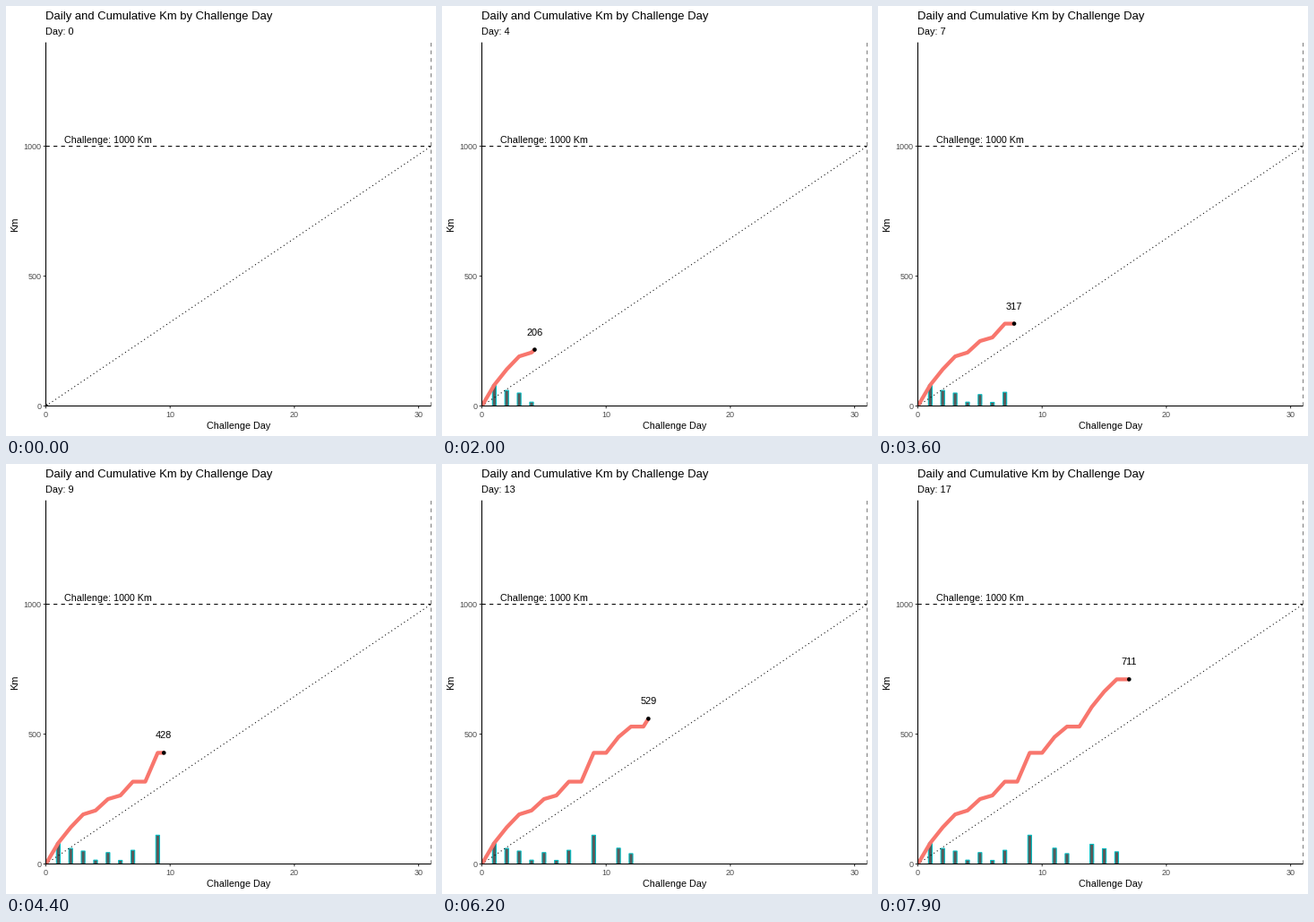
Write a matplotlib script that moves like this. It is 480 px wide and 480 px high and loops after 8000 ms.

```python
import numpy as np
import matplotlib.pyplot as plt
from matplotlib.animation import FuncAnimation
from matplotlib.patches import Circle, Rectangle

plt.rcParams["font.family"] = "Liberation Sans"

SIZE, DPI = 480, 72
FRAMES, INTERVAL = 80, 100
LEFT, RIGHT, TOP, BOTTOM = 44.5, 474.5, 40.6, 446.5
DAYS, MAX_KM, GOAL = 31, 1400, 1000
THIN = 0.5 * 72.27 / 25.4 * 0.75  # half a millimetre stroke unit
BAR = 0.3

daily = np.array([0, 81, 60, 50, 15, 44, 14, 53, 0, 111, 0, 61, 40, 0, 76, 59, 47, 0])
total = np.cumsum(daily)
days = np.arange(len(daily))
# Each day lands on a whole frame; motion between days is linear.
keys = np.round(days * 144 / DAYS)


def px(day):
    return LEFT + np.asarray(day) * (RIGHT - LEFT) / DAYS


def py(km):
    return BOTTOM - np.asarray(km) * (BOTTOM - TOP) / MAX_KM


fig = plt.figure(figsize=(SIZE / DPI, SIZE / DPI), dpi=DPI, facecolor="white")
ax = fig.add_axes([0, 0, 1, 1])
ax.set_xlim(0, SIZE)
ax.set_ylim(SIZE, 0)
ax.axis("off")

panel = Rectangle((LEFT - 0.5, TOP), RIGHT - LEFT + 0.5, BOTTOM - TOP + 0.5,
                  transform=ax.transData)


def line(xs, ys, color="black", width=THIN, z=2, **kw):
    return ax.plot(xs, ys, color=color, lw=width, zorder=z, snap=False,
                   solid_capstyle="butt", dash_capstyle="butt", **kw)[0]


def label(x, y, text, size=10.75, color="black", ha="left", **kw):
    return ax.text(x, y, text, fontsize=size, color=color, ha=ha,
                   va="baseline", zorder=6, **kw)


# Titles
label(LEFT, 15, "Daily and Cumulative Km by Challenge Day", 13)
subtitle = label(LEFT, 32, "", 11)
label((LEFT + RIGHT) / 2, 472, "Challenge Day", ha="center")
ax.text(15.3, (TOP + BOTTOM) / 2, "Km", fontsize=11, rotation=90,
        ha="right", va="center")

# Axes
line([LEFT, LEFT], [TOP, BOTTOM], z=5)
line([LEFT, RIGHT], [BOTTOM, BOTTOM], z=5)
for day in (0, 10, 20, 30):
    line([px(day)] * 2, [BOTTOM, BOTTOM + 2.75], "#333333", z=4)
    label(px(day), 459, str(day), 9, "#4d4d4d", "center")
for km in (0, 500, 1000):
    line([LEFT - 2.75, LEFT], [py(km)] * 2, "#333333", z=4)
    label(LEFT - 4.95, py(km) + 3.2, str(km), 9, "#4d4d4d", "right")

# Goal lines
line([LEFT, RIGHT], [py(GOAL)] * 2, ls=(0, (4, 4)))
line([RIGHT, RIGHT], [BOTTOM, TOP], "#808080", ls=(0, (4, 4)))
line([LEFT, RIGHT], [BOTTOM, py(GOAL)], ls=(0, (1, 3)))
label(px(5), 153, "Challenge: 1000 Km", ha="center")

# Moving parts
bars = []
for day, km in zip(days[1:], daily[1:]):
    bar = Rectangle((px(day - BAR / 2), py(km)), px(BAR) - LEFT, BOTTOM - py(km),
                    fc="#595959", ec="#00bfc4", lw=THIN, zorder=1, snap=False)
    ax.add_patch(bar)
    bar.set_clip_path(panel)
    bars.append(bar)
trail = line([], [], "#f8766d", 4 * THIN, 3, solid_joinstyle="round")
trail.set_clip_path(panel)
dot = Circle((LEFT, BOTTOM), 2.3, fc="black", lw=0, zorder=4)
ax.add_patch(dot)
dot.set_clip_path(panel)
count = label(LEFT, BOTTOM, "", 11, ha="center")


def update(i):
    now = np.interp(i, keys, days)
    day = int(now + 1e-9)
    km = np.interp(now, days, total)
    x, y = px(now), py(km)

    subtitle.set_text(f"Day: {day}")
    for n, bar in enumerate(bars, 1):
        bar.set_visible(n <= day)
    trail.set_data(np.append(px(days[:day + 1]), x),
                   np.append(py(total[:day + 1]), y))
    dot.center = (x, y)
    # The count switches halfway between two days.
    nearest = int(now + 0.5)
    count.set_text(str(total[nearest]) if nearest else "")
    count.set_position((x, y - 16))
    return [subtitle, trail, dot, count, *bars]


anim = FuncAnimation(fig, update, frames=FRAMES, interval=INTERVAL,
                     repeat=True, repeat_delay=0, blit=False)
plt.show()
```
